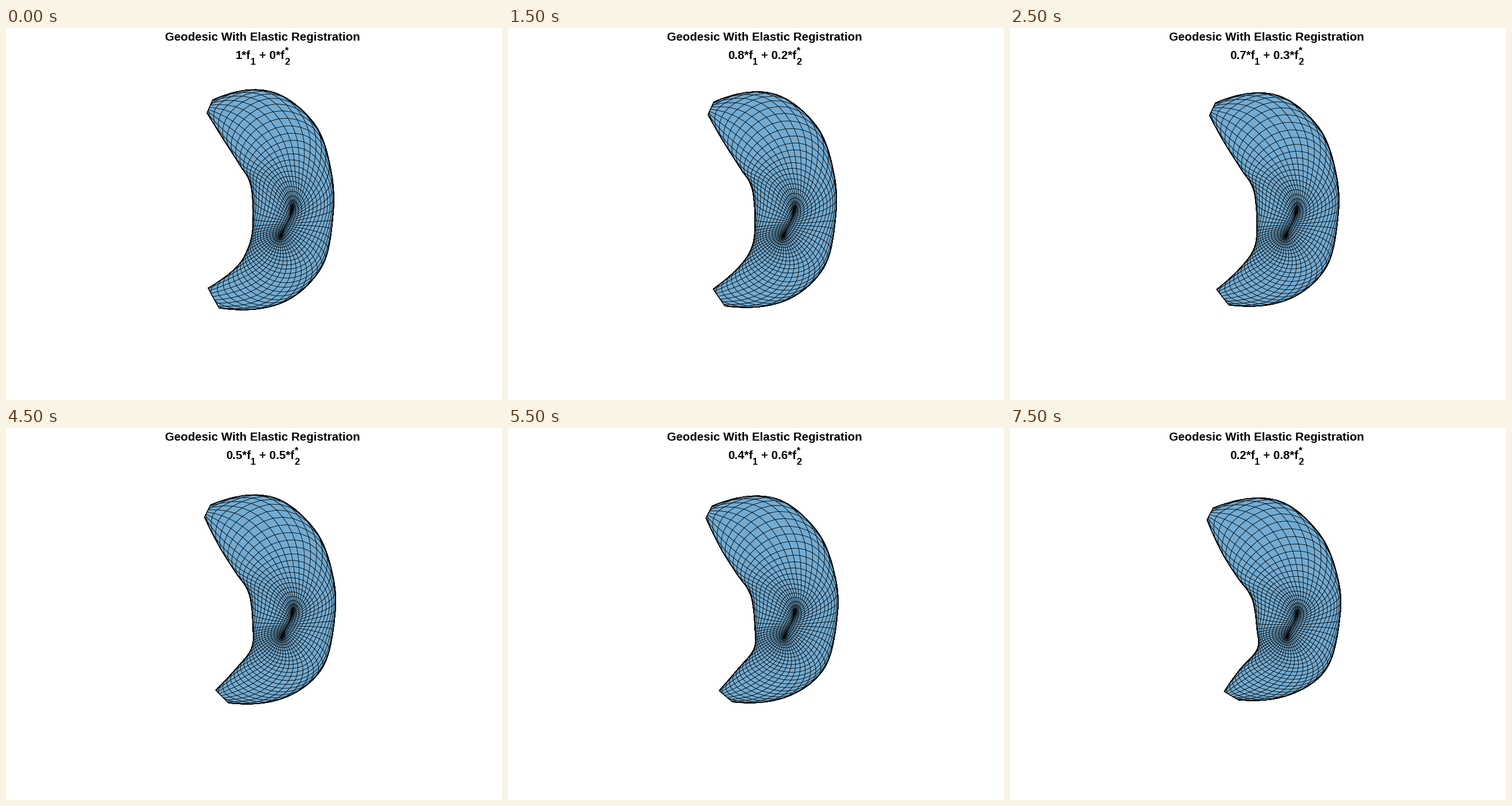
Animation of 864 by 648 pixels, one loop 8 s. Source, as a matplotlib script:

```python
import numpy as np
import matplotlib.pyplot as plt
from matplotlib.animation import FuncAnimation
from matplotlib.collections import PolyCollection

W, H, DPI = 864, 648, 72
BLUE = "#72acd3"
FONT = dict(family="Liberation Sans", weight="bold", color="black")
SIZE, SMALL = 20.53, 16.4
CENTER = 447
RINGS, MERIDIANS = 28, 60
BELOW, ABOVE = 3, 4     # edge intervals on either side of the pole


def points(*xy):
    return np.array(xy, float).reshape(-1, 2)


# Both edges of the crescent, from the lower tip to the upper one.
LEFT_START = points(352, 453, 400, 418, 421, 385, 430, 345,
                    427, 275, 408, 240, 378, 193, 350, 148)
RIGHT_START = points(371, 488, 478, 480, 548, 420, 569, 335,
                     567, 252, 537, 166, 460, 110, 360, 125)
LEFT_END = points(373, 459, 400, 421, 431, 385, 430, 350,
                  422, 297, 396, 260, 369, 217, 343, 160)
RIGHT_END = points(398, 474, 487, 465, 551, 420, 574, 337,
                   572, 265, 539, 184, 463, 125, 354, 139)


def smooth(keys, u):
    """Hermite curve through the keys at parameter u (in key intervals)."""
    slope = np.gradient(keys, axis=0, edge_order=2)
    i = np.clip(u.astype(int), 0, len(keys) - 2)
    t = (u - i)[..., None]
    a, b, da, db = keys[i], keys[i + 1], slope[i], slope[i + 1]
    ease = t * t * (3 - 2 * t)
    return a + (b - a) * ease + t * (1 - t) * (da * (1 - t) - db * t)


def polar_net():
    """Rings around the pole, as places along and across the crescent."""
    radius = 1.2 * np.linspace(0, 1, RINGS + 1)[:, None] ** 1.5
    angle = np.linspace(0, 2 * np.pi, MERIDIANS + 1)[None, :]
    reach = np.where(np.cos(angle) > 0, ABOVE, BELOW)
    slit = 0.28
    offset = np.cos(angle) * (slit + (reach - slit) * radius)
    lean = 0.42 * offset * np.exp(-(offset / 0.7) ** 2) - 0.15
    # The surface turns away from the viewer at the edges.
    turn = np.clip(3.2 * radius * np.sin(angle) + lean, -np.pi / 2, np.pi / 2)
    along = np.clip(BELOW + offset, 0, BELOW + ABOVE)
    return along, (1 + np.sin(turn)[..., None]) / 2


def surface(left, right):
    along, across = polar_net()
    return (1 - across) * smooth(left, along) + across * smooth(right, along)


def quads(g):
    corners = [g[:-1, :-1], g[1:, :-1], g[1:, 1:], g[:-1, 1:]]
    return np.stack(corners, axis=2).reshape(-1, 4, 2)


def advance(text, size):
    em = {" ": 0.278, ".": 0.278, "*": 0.389, "f": 0.333, "+": 0.584}
    return size * sum(em.get(ch, 0.556) for ch in text)


START = quads(surface(LEFT_START, RIGHT_START))
END = quads(surface(LEFT_END, RIGHT_END))

fig = plt.figure(figsize=(W / DPI, H / DPI), dpi=DPI, facecolor="white")
ax = fig.add_axes([0, 0, 1, 1])
ax.set_xlim(0, W)
ax.set_ylim(H, 0)
ax.axis("off")

mesh = ax.add_collection(PolyCollection(
    START, facecolor=BLUE, edgecolor="black", linewidth=0.72,
    joinstyle="round"))
ax.text(CENTER, 22.3, "Geodesic With Elastic Registration", size=SIZE,
        ha="center", va="baseline", **FONT)


def label(y, size, text=""):
    return ax.text(0, y, text, size=size, ha="left", va="baseline", **FONT)


first, first_sub = label(54, SIZE), label(64.5, SMALL, "1")
second, second_sub = label(54, SIZE), label(64.5, SMALL, "2")
star = label(45, SMALL, "*")


def set_formula(w):
    left, right = f"{1 - w:.2g}*f", f"+ {w:.2g}*f"
    widths = [advance(left, SIZE), advance("1", SMALL), advance(" ", SIZE),
              advance(right, SIZE), advance("2", SMALL)]
    x = CENTER - sum(widths) / 2 + np.cumsum([0] + widths)
    first.set_text(left)
    second.set_text(right)
    for part, px in ((first, x[0]), (first_sub, x[1]), (second, x[3]),
                     (second_sub, x[4]), (star, x[4])):
        part.set_x(px)


def update(i):
    step = (i + 1) // 2
    mesh.set_verts(START + (END - START) * step / 8)
    set_formula(step / 10)
    return mesh, first, first_sub, second, second_sub, star


anim = FuncAnimation(fig, update, frames=16, interval=500, repeat=True,
                     repeat_delay=0, blit=False)
plt.show()
```
